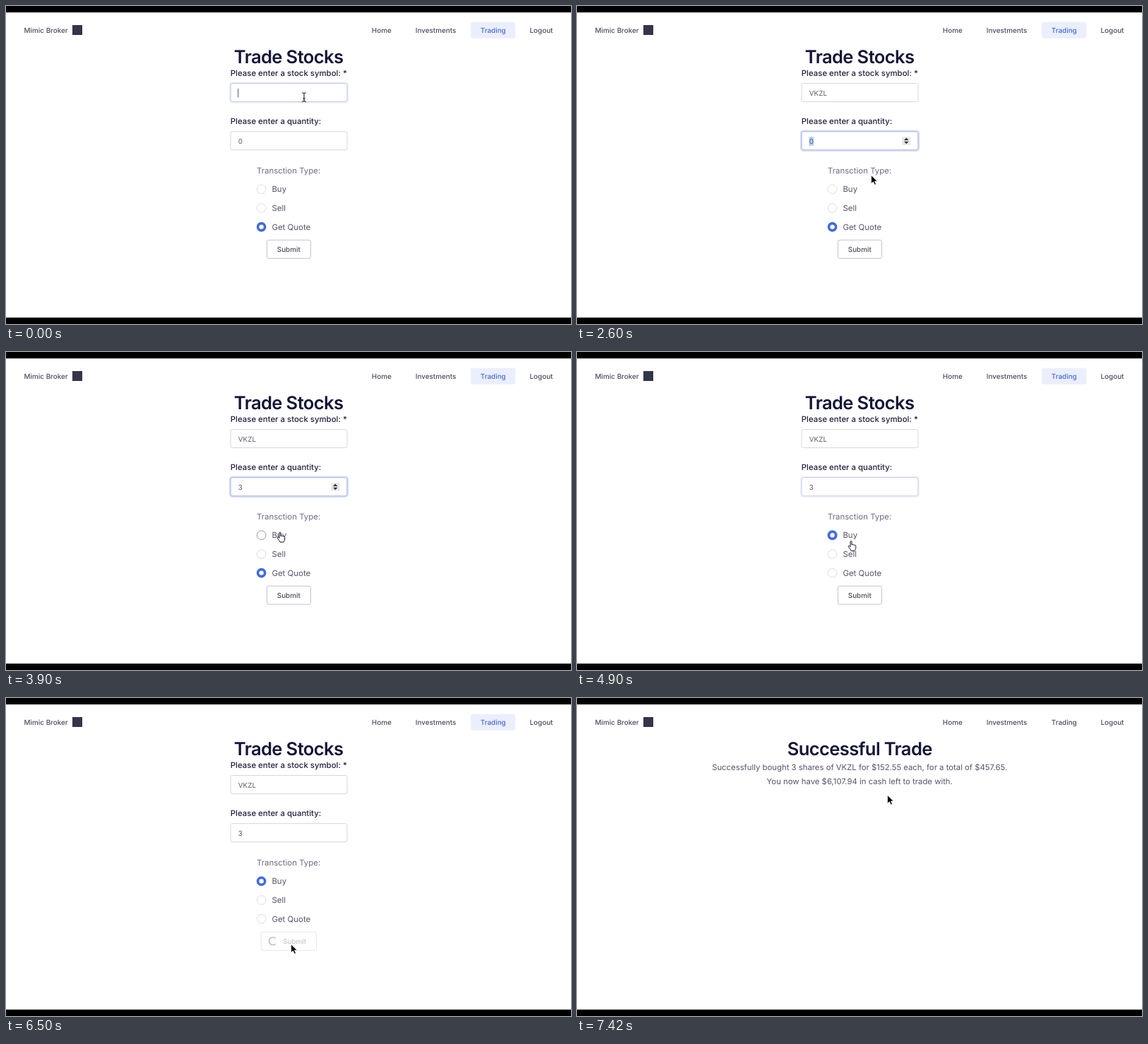
Recreate the animation shown at these times as an HTML page. Size 800 px wide and 450 px high, loop 7.53 s.

```html
<!DOCTYPE html>
<html lang="en">
<head>
<meta charset="utf-8">
<title>Trade Stocks</title>
<style>
  html, body { margin: 0; width: 100%; height: 100%; overflow: hidden; background: #fff; }
  svg { display: block; width: 100vw; height: 100vh; }
  text {
    font: 400 11.44px Inter, "Liberation Sans", sans-serif;
    font-optical-sizing: none;
    text-rendering: geometricPrecision;
    fill: #55566a;
  }
  .nav { font-size: 9.87px; font-weight: 500; fill: #4a4b5c; }
  .title { font-size: 25.6px; font-weight: 600; letter-spacing: -.025em; fill: #151536; }
  .label { font-size: 11.4px; font-weight: 500; fill: #211f3c; }
  .legend { fill: #6c6c86; }
  .value { font-size: 9.85px; fill: #5c5d68; }
  .note { font-size: 11.33px; }
  .mid { text-anchor: middle; }
  .box { fill: #fff; stroke: #d6d7de; }
  .ring { fill: none; stroke: #d9e0fa; stroke-width: 2.4; }
  .edge { fill: none; stroke: #adb9e6; }
  .dot { fill: #fff; stroke: #dddee4; }
  .on { fill: #fff; stroke: #4069e5; stroke-width: 3.6; }
  .caret { fill: #3c3d4a; }
  .ink { fill: none; stroke: #222; stroke-width: 1.1; }
</style>
</head>
<body>
<svg viewBox="0 0 800 450">
  <rect width="800" height="450" fill="#fff"/>
  <rect width="800" height="9.1"/>
  <rect y="440.9" width="800" height="9.1"/>

  <text class="nav" x="25.6" y="37.6">Mimic Broker</text>
  <rect x="94" y="27" width="14" height="14" fill="#34354a"/>
  <rect id="pill" x="658" y="22.7" width="63.4" height="23" rx="3" fill="#ebeffd"/>
  <text class="nav mid" x="531.8" y="37.6">Home</text>
  <text class="nav mid" x="608.5" y="37.6">Investments</text>
  <text class="nav mid" id="trading" x="689.8" y="37.6">Trading</text>
  <text class="nav mid" x="758" y="37.6">Logout</text>

  <g id="form">
    <text class="title mid" x="400.1" y="81">Trade Stocks</text>
    <text class="label" x="317.8" y="99.1">Please enter a stock symbol: *</text>
    <rect class="box" x="318" y="109.5" width="165" height="26" rx="2.5"/>
    <g id="focus1">
      <rect class="ring" x="317" y="108.5" width="167" height="28" rx="3.5"/>
      <rect class="edge" x="318" y="109.5" width="165" height="26" rx="2.5"/>
    </g>
    <text class="value" id="symbol" x="328.8" y="126.6"></text>
    <rect class="caret" id="caret1" y="117" width=".9" height="12.4"/>

    <text class="label" x="317.8" y="167.4">Please enter a quantity:</text>
    <rect class="box" x="318" y="177.7" width="165" height="26" rx="2.5"/>
    <g id="focus2">
      <rect class="ring" id="ring2" x="317" y="176.7" width="167" height="28" rx="3.5"/>
      <rect class="edge" x="318" y="177.7" width="165" height="26" rx="2.5"/>
    </g>
    <rect id="select" x="328.5" y="185" width="6.8" height="12.6" fill="#b2d0f6"/>
    <text class="value" id="amount" x="328.8" y="194.8"></text>
    <rect class="caret" id="caret2" x="334.8" y="185.2" width=".9" height="12.4"/>
    <g id="stepper">
      <rect x="460" y="185" width="12.6" height="11.8" rx="2" fill="#e9e9eb"/>
      <path d="M463 190l3.3-3.4 3.3 3.4zM463 191.8l3.3 3.4 3.3-3.4z" fill="#333"/>
    </g>

    <text class="legend" x="355" y="236.6">Transction Type:</text>
    <circle class="dot" id="buyDot" cx="361.6" cy="259.2" r="6.3"/>
    <circle class="dot" cx="361.6" cy="286" r="6.3"/>
    <circle class="dot" cx="361.6" cy="312.6" r="6.3"/>
    <circle id="glow" cx="361.6" cy="259.2" r="7.6" fill="#cbd7fa"/>
    <circle class="on" id="pick" cx="361.6" r="5"/>
    <text x="376.4" y="263.3">Buy</text>
    <text x="376.4" y="290.1">Sell</text>
    <text x="376.4" y="316.7">Get Quote</text>

    <rect class="box" id="button" y="331.2" height="26" rx="2.5"/>
    <path id="spin" d="M3.8 3.8A5.4 5.4 0 1 1 3.8-3.8" fill="none" stroke="#c3c4cc" stroke-width="1.8"/>
    <text class="nav mid" id="submit" y="347.6">Submit</text>
  </g>

  <g id="done">
    <text class="title mid" x="400.2" y="81">Successful Trade</text>
    <text class="note mid" x="400.2" y="101.6">Successfully bought 3 shares of VKZL for $152.55 each, for a total of $457.65.</text>
    <text class="note mid" x="400.2" y="121.6">You now have $6,107.94 in cash left to trade with.</text>
  </g>

  <g id="pointer">
    <path id="arrow" d="M-.4-.6V11.4L2.4 8.8 4.5 13.2 6.5 12.3 4.6 8H8.3Z" stroke="#fff" stroke-width=".8"/>
    <path id="beam" class="ink" d="M-3-6.3Q0-6.3 0-4.8Q0-6.3 3-6.3M0-4.8V4.8M-3 6.3Q0 6.3 0 4.8Q0 6.3 3 6.3M-1.8 2H1.8"/>
    <path id="hand" fill="#fff" stroke="#111" stroke-width="1" d="M-1 1c0-1.4 2-1.4 2 0V5.5c.3-1 2-.8 2 .3c.4-.9 1.9-.6 1.9.5c.4-.7 1.8-.4 1.8.8V10c0 2.3-1.3 2.6-1.5 4H0C-.3 12.3-2 11-3.6 8.4c-.7-1.2.6-2 1.5-1.2L-1 8.3Z"/>
  </g>
</svg>
<script>
  const LOOP = 7530;
  const KEYS = [500, 700, 900, 1100];
  const TAB = 1400, DIGIT = 3000, PICK = 4800, HOVER = 5700, SEND = 6400, DONE = 6600;

  // time, x, y
  const path = [
    [0, 422, 129], [1900, 422, 129], [2000, 424, 190], [2100, 428, 242],
    [2400, 427, 242], [2600, 417, 240], [2700, 418, 243], [3300, 418, 243],
    [3900, 388, 255], [4400, 388, 255], [4600, 386, 259], [4800, 386, 259],
    [5400, 414, 372], [5500, 414, 372], [5800, 404, 349], [6800, 404, 349],
    [7400, 440, 138], [LOOP, 440, 138]
  ];

  const $ = id => document.getElementById(id);
  const set = (id, attrs) => { for (const k in attrs) $(id).setAttribute(k, attrs[k]); };
  const show = (id, on) => set(id, { visibility: on ? 'inherit' : 'hidden' });
  const ramp = (t, from, to) => Math.min(1, Math.max(0, (t - from) / (to - from)));
  const within = (t, from, to) => t >= from && t < to;

  function pointerAt(t) {
    const i = path.findIndex(p => p[0] > t);
    const [t0, x0, y0] = path[i - 1], [t1, x1, y1] = path[i];
    const u = ramp(t, t0, t1), k = u * u * (3 - 2 * u);
    return [x0 + (x1 - x0) * k, y0 + (y1 - y0) * k];
  }

  function drawPointer(t) {
    const [x, y] = pointerAt(t);
    const beam = t < 2400 && (within(y, 109, 137) || within(y, 178, 205));
    const hand = within(t, 3600, 5400) && within(y, 249, 325) && x < 401;
    set('pointer', { transform: `translate(${x} ${y})` });
    show('pointer', !within(t, KEYS[0], 1900) && !within(t, DIGIT, 3300));
    show('beam', beam);
    show('hand', hand);
    show('arrow', !beam && !hand);
  }

  function drawForm(t) {
    const typed = KEYS.filter(k => t >= k).length;
    $('symbol').textContent = 'VKZL'.slice(0, typed);
    set('caret1', { x: 328.3 + (typed ? $('symbol').getComputedTextLength() + .8 : 0) });
    show('caret1', t < TAB && !within(t, 300, KEYS[0]));
    set('focus1', { opacity: (.45 + .55 * ramp(t, 0, 300)) * (1 - ramp(t, TAB, 1700)) });

    const editing = within(t, TAB, PICK);
    set('focus2', { opacity: t < TAB ? 0 : 1 - ramp(t, PICK - 100, PICK + 200) });
    set('ring2', { opacity: ramp(t, TAB, 1700) });
    show('select', within(t, TAB, DIGIT));
    show('stepper', editing);
    show('caret2', within(t, DIGIT, 3600) || within(t, 4100, 4600));
    $('amount').textContent = t < DIGIT ? '0' : '3';

    set('pick', { cy: t < PICK ? 312.6 : 259.2 });
    show('glow', within(t, PICK, SEND));
    $('buyDot').style.stroke = within(t, 3700, PICK) ? '#9b9ca6' : '';

    const busy = t >= SEND;
    set('button', { x: busy ? 361.2 : 369.5, width: busy ? 78.4 : 62 });
    $('button').style.stroke = busy ? '#e6e6ea' : t >= HOVER ? '#a9aab4' : '#c3c4cb';
    set('submit', { x: busy ? 408.7 : 400.3 });
    $('submit').style.fill = busy ? '#c5c6ce' : '';
    show('spin', busy);
    set('spin', { transform: `translate(378 344) rotate(${(t - 6500) * .36})` });
  }

  function draw(now) {
    const t = Math.floor(now % LOOP / 100) * 100;  // ten pictures a second
    const done = t >= DONE;
    show('form', !done);
    show('done', done);
    show('pill', !done);
    $('trading').style.fill = done ? '' : '#4468d4';
    drawForm(t);
    drawPointer(t);
  }

  const start = performance.now();
  function tick() {
    draw(performance.now() - start);
    requestAnimationFrame(tick);
  }
  tick();
</script>
</body>
</html>
```
